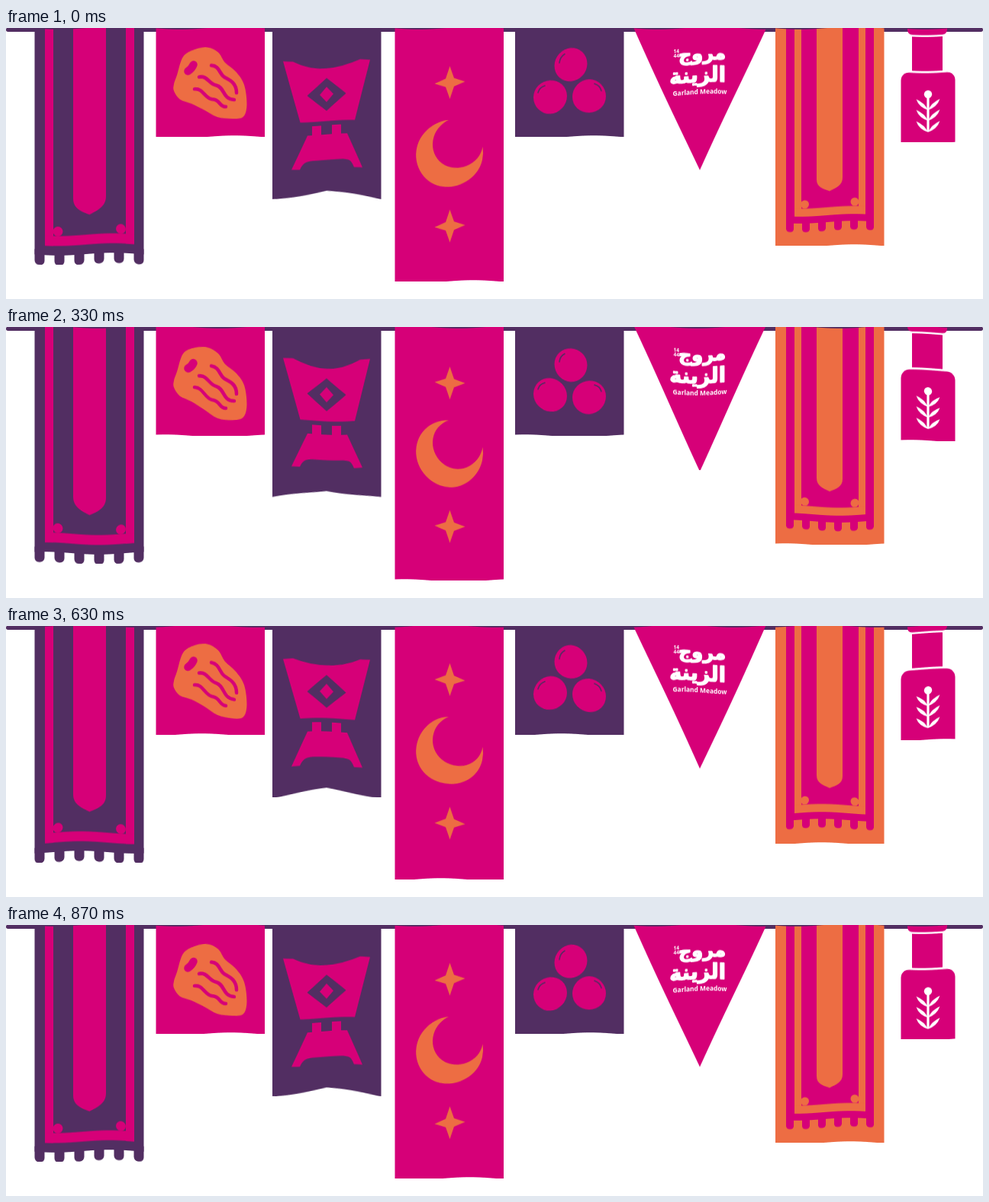
An HTML page with a canvas that plays this animation: 1280 px wide and 356 px high, repeating every 0.9 s.

```html
<!DOCTYPE html>
<html lang="en">
<head>
<meta charset="utf-8">
<title>Festive bunting</title>
<style>
  html, body { margin: 0; width: 100%; height: 100%; overflow: hidden; background: #fff; }
  canvas { display: block; width: 1280px; height: 356px; }
</style>
</head>
<body>
<canvas id="stage" width="1280" height="356"></canvas>
<script>
const PURPLE = '#522e62', PINK = '#d60078', ORANGE = '#ed6d43', WHITE = '#fff';
const LOOP = 900, STEP = 30, WAVELENGTH = 142, SWING = 1.8, LEAD = 200, PAD = 4;
const stage = document.getElementById('stage').getContext('2d');

// Drawing helpers; all coordinates are stage coordinates of the hanging cloth at rest.
function fill(c, color, path) {
  c.fillStyle = color;
  c.fill(new Path2D(path));
}
function stroke(c, color, width, path) {
  c.strokeStyle = color;
  c.lineWidth = width;
  c.lineCap = c.lineJoin = 'round';
  c.stroke(new Path2D(path));
}
function box(c, color, left, top, right, bottom) {
  c.fillStyle = color;
  c.fillRect(left, top, right - left, bottom - top);
}
function disc(c, color, x, y, rx, ry = rx) {
  c.fillStyle = color;
  c.beginPath();
  c.ellipse(x, y, rx, ry, 0, 0, 2 * Math.PI);
  c.fill();
}
function rounded(c, color, left, top, right, bottom, radii) {
  c.fillStyle = color;
  c.beginPath();
  c.roundRect(left, top, right - left, bottom - top, radii);
  c.fill();
}
function diamond(c, color, x, y, rx, ry) {
  fill(c, color, `M${x - rx} ${y}L${x} ${y - ry}L${x + rx} ${y}L${x} ${y + ry}Z`);
}
function star(c, x, y) {
  const waist = 5.5;
  fill(c, ORANGE, `M${x} ${y - 21.5}L${x + waist} ${y - waist}L${x + 20} ${y}L${x + waist} ${y + waist}` +
    `L${x} ${y + 21.5}L${x - waist} ${y + waist}L${x - 20} ${y}L${x - waist} ${y - waist}Z`);
}
function fringe(c, color, first, pitch, width, top, bottom) {
  for (let i = 0; i < 6; i++) {
    const x = first + i * pitch;
    rounded(c, color, x, top, x + width, bottom, [0, 0, width / 2.3, width / 2.3]);
  }
}
function arch(c, color, left, right, shoulder, tip) {
  const mid = (left + right) / 2, bend = (tip - shoulder) * 0.6;
  fill(c, color, `M${left} 0V${shoulder}C${left} ${shoulder + bend} ${mid - 9} ${tip - 4} ${mid} ${tip}` +
    `C${mid + 9} ${tip - 4} ${right} ${shoulder + bend} ${right} ${shoulder}V0Z`);
}
// Smooth closed curve through [x, y] points
function blob(c, color, points) {
  const at = i => points[(i + points.length) % points.length];
  c.fillStyle = color;
  c.beginPath();
  c.moveTo(...points[0]);
  points.forEach((p, i) => {
    const before = at(i - 1), next = at(i + 1), after = at(i + 2);
    c.bezierCurveTo(p[0] + (next[0] - before[0]) / 6, p[1] + (next[1] - before[1]) / 6,
      next[0] - (after[0] - p[0]) / 6, next[1] - (after[1] - p[1]) / 6, next[0], next[1]);
  });
  c.fill();
}
function text(c, words, x, y, font, align, weight = 0) {
  c.fillStyle = c.strokeStyle = WHITE;
  c.font = font;
  c.textAlign = align;
  c.fillText(words, x, y);
  if (weight) {
    c.lineWidth = weight;
    c.lineJoin = 'round';
    c.strokeText(words, x, y);
  }
}

function purpleRug(c) {
  box(c, PURPLE, 37.5, 0, 180.5, 297);
  fringe(c, PURPLE, 37.5, 26, 13, 290, 310.5);
  box(c, PINK, 51, 0, 62, 284.5);
  box(c, PINK, 157, 0, 168, 284.5);
  box(c, PINK, 51, 271.5, 168, 284.5);
  disc(c, PINK, 68, 265.5, 6.5);
  disc(c, PINK, 150.5, 265.5, 6.5);
  arch(c, PINK, 88, 131, 223, 245.5);
}
function steak(c) {
  box(c, PINK, 196.5, 0, 339, 143);
  blob(c, ORANGE, [[224, 60], [232, 36], [247, 27], [264, 25.5], [278, 33], [287, 47], [301, 59], [312, 76],
    [315.5, 102], [311, 118], [297, 121], [277, 118], [259, 107], [243, 98], [228, 92], [220, 81], [220, 72]]);
  stroke(c, PINK, 10.5, 'M245.5 47Q243.5 52 238.5 55');
  stroke(c, PINK, 4.5, 'M269 49.5C280 51 279 61 286 66C295 71 302 75 302 87');
  stroke(c, PINK, 4.5, 'M253 63.5C264 62 266 74 275 76C287 79 283 95 299 96');
  stroke(c, PINK, 4.5, 'M247 79C258 78 260 92 270 94C281 95 279 105 288 105');
}
function burner(c) {
  fill(c, PURPLE, 'M349 0H491.5V224.7L420 214L349 224.7Z');
  fill(c, PINK, 'M363 42.5H376Q420 64 464 42.5H477L457 122.5H385.5Z');
  diamond(c, PURPLE, 420, 87.5, 25.5, 21.5);
  diamond(c, PINK, 420, 87.5, 9, 10);
  box(c, PINK, 401, 128, 413, 142);
  box(c, PINK, 427, 128, 439, 142);
  fill(c, PINK, 'M395 140H447L467 184.5H456C452 174 449 174 438 173.5H402C392 174 389 176 385 184.5H374Z');
}
function moon(c) {
  box(c, PINK, 509.5, 0, 652, 333);
  star(c, 581.5, 72);
  star(c, 581.5, 260.5);
  fill(c, ORANGE, 'M580 121A44 44 0 1 0 624.5 157.5A33 33 0 1 1 580 121Z');
}
function dumplings(c) {
  box(c, PURPLE, 667, 0, 809.5, 143);
  disc(c, PINK, 740, 48.5, 21.5, 22);
  disc(c, PINK, 713, 89.3, 22);
  disc(c, PINK, 764, 91, 22);
  stroke(c, PURPLE, 1.6, 'M725 45Q726 37 732 34');
  stroke(c, PURPLE, 1.6, 'M697 83Q699 76 706 74');
  stroke(c, PURPLE, 1.6, 'M771 75Q778 77 780 84');
}
function pennant(c) {
  fill(c, PINK, 'M822.5 0H995.5L909 188Z');
  c.direction = 'rtl';
  text(c, 'مروج', 943, 43, 'bold 24px "DejaVu Sans", sans-serif', 'right', 1.4);
  text(c, 'الزينة', 943, 72, 'bold 27px "DejaVu Sans", sans-serif', 'right', 1.4);
  c.direction = 'ltr';
  const tiny = 'bold 6.5px "Noto Sans", sans-serif';
  text(c, '14', 874.5, 32, tiny, 'left');
  text(c, '44', 874.5, 38, tiny, 'left');
  text(c, 'Garland Meadow', 909, 88, 'bold 8.4px "Noto Sans", sans-serif', 'center');
}
function orangeRug(c) {
  box(c, ORANGE, 1008, 0, 1150.5, 286);
  box(c, PINK, 1022, 0, 1137, 255);
  fringe(c, PINK, 1022, 21, 10, 250, 266.5);
  box(c, ORANGE, 1033, 0, 1042, 246);
  box(c, ORANGE, 1117, 0, 1126, 246);
  box(c, ORANGE, 1033, 235.5, 1126, 246);
  disc(c, ORANGE, 1046.5, 230, 5.5);
  disc(c, ORANGE, 1112, 230, 5.5);
  arch(c, ORANGE, 1062, 1096, 198, 214.5);
}
function bottle(c) {
  rounded(c, PINK, 1181, 0, 1233, 7.8, [0, 0, 6, 6]);
  box(c, WHITE, 1185, 7.8, 1229, 10);
  box(c, PINK, 1187, 10, 1227, 54.8);
  rounded(c, PINK, 1172.5, 57.5, 1243.5, 150, [11, 11, 0, 0]);
  disc(c, WHITE, 1208, 85.3, 5.2);
  stroke(c, WHITE, 3.2, 'M1208 86V133');
  for (const y of [106, 120, 135]) {
    for (const side of [-1, 1]) {
      const tip = 1208 + side * 15.5;
      fill(c, WHITE, `M1208 ${y}Q${1208 + side * 12} ${y - 4} ${tip} ${y - 14}Q${1208 + side * 5} ${y - 10} 1208 ${y}Z`);
    }
  }
}

// Each piece is painted once on its own cloth, then waved column by column.
const cloths = [
  [purpleRug, 37, 144, 311],
  [steak, 196, 143, 143],
  [burner, 349, 143, 225],
  [moon, 509, 143, 333],
  [dumplings, 667, 143, 143],
  [pennant, 822, 174, 188],
  [orangeRug, 1008, 143, 286],
  [bottle, 1172, 72, 150]
].map(([paint, left, width, height]) => {
  const image = document.createElement('canvas');
  image.width = width;
  image.height = height + 2 * PAD;
  const c = image.getContext('2d');
  c.translate(-left, PAD);
  paint(c);
  return { image, left, width, height };
});

function wave(x, time) {
  return SWING * Math.cos(2 * Math.PI * (x / WAVELENGTH - (time + LEAD) / LOOP));
}
function draw(time) {
  stage.clearRect(0, 0, 1280, 356);
  rounded(stage, PURPLE, 0, -0.5, 1280, 5, 2.7);
  for (const { image, left, width, height } of cloths) {
    stage.save();
    stage.beginPath();
    stage.rect(left, 0, width, height);
    stage.clip();
    for (let x = 0; x < width; x++) {
      stage.drawImage(image, x, 0, 1, image.height, left + x, wave(x, time) - PAD, 1, image.height);
    }
    stage.restore();
  }
}

const start = performance.now();
function tick() {
  const time = (performance.now() - start) % LOOP;
  draw(Math.floor(time / STEP) * STEP);
  requestAnimationFrame(tick);
}
tick();
</script>
</body>
</html>
```
